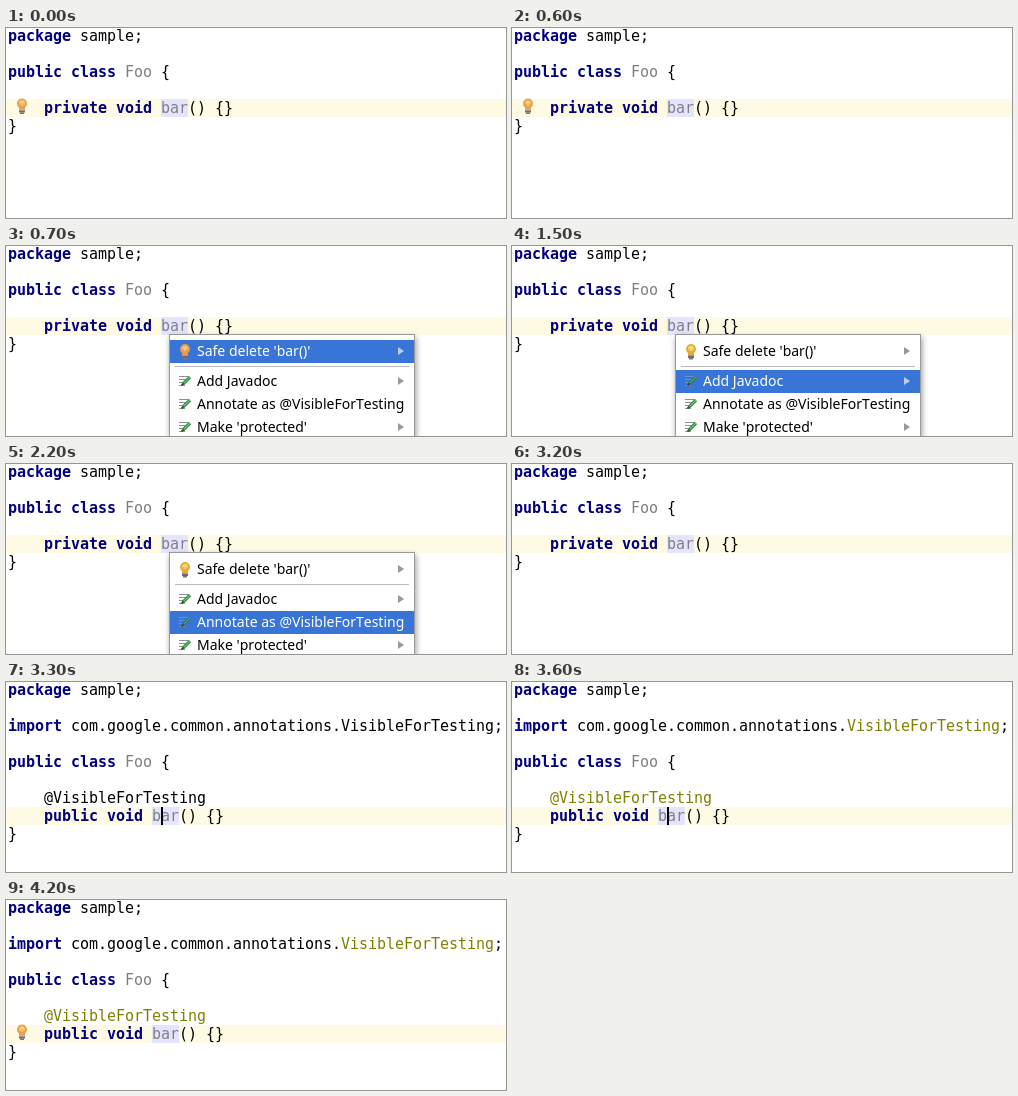
These frames come from a looping animation (500x190 px, 4.5 s). An HTML page with a canvas:

```html
<!DOCTYPE html>
<html lang="en">
<head>
<meta charset="utf-8">
<title>Annotate a method</title>
<style>
html, body { margin: 0; width: 100%; height: 100%; overflow: hidden; background: #fff; }
canvas { display: block; }
</style>
</head>
<body>
<canvas id="stage" width="500" height="190"></canvas>
<script>
const ctx = document.getElementById('stage').getContext('2d');
const LOOP = 4500, CELL = 9, LINE = 18, LEFT = 2;
const MONO = '15px "DejaVu Sans Mono", monospace';
const MENU_FONT = '14px "Noto Sans", sans-serif';
const BLACK = '#000', NAVY = '#000080', GRAY = '#808080', OLIVE = '#808000';

const MENU = [
  { text: "Safe delete 'bar()'", top: 94, icon: 'bulb', arrow: true },
  { text: 'Add Javadoc', top: 124, icon: 'pencil', arrow: true },
  { text: 'Annotate as @VisibleForTesting', top: 147, icon: 'pencil', arrow: false },
  { text: "Make 'protected'", top: 170, icon: 'pencil', arrow: true }
];

const colX = col => LEFT + col * CELL;
const lineY = row => row * LINE - 1;
const within = (t, from, to) => t >= from && t < to;

function rect(x, y, w, h, color) {
  ctx.fillStyle = color;
  ctx.fillRect(x, y, w, h);
}

function stroke(x1, y1, x2, y2, color, width) {
  ctx.strokeStyle = color;
  ctx.lineWidth = width;
  ctx.beginPath();
  ctx.moveTo(x1, y1);
  ctx.lineTo(x2, y2);
  ctx.stroke();
}

// Each part is [text, color]; keywords are navy and bold.
function code(row, col, ...parts) {
  for (const [text, color = BLACK] of parts) {
    ctx.font = (color === NAVY ? 'bold ' : '') + MONO;
    ctx.fillStyle = color;
    for (const ch of text) ctx.fillText(ch, colX(col++), lineY(row) + 14);
  }
}

function bulb(x, y, color, glow) {
  ctx.fillStyle = color;
  ctx.beginPath();
  ctx.arc(x, y, 5, 0, Math.PI * 2);
  ctx.fill();
  rect(x - 3, y + 3, 6, 3, color);
  ctx.fillStyle = glow;
  ctx.beginPath();
  ctx.arc(x, y - 0.5, 2.8, 0, Math.PI * 2);
  ctx.fill();
  stroke(x - 1.5, y, x - 0.5, y + 5, color, 0.8);
  stroke(x + 1.5, y, x + 0.5, y + 5, color, 0.8);
  rect(x - 3, y + 6, 6, 1, '#a79aa4');
  rect(x - 3, y + 7, 6, 2, '#6f6878');
  rect(x - 2, y + 9, 4, 1.5, '#7b7480');
}

function pencil(x, y, selected) {
  const ink = selected ? '#6f8fc4' : '#8d9298';
  [9, 11, 8, 6].forEach((w, i) => rect(x - 6, y - 5 + i * 3, w, 1, ink));
  stroke(x - 2, y + 3, x + 5, y - 4, selected ? '#2f7d6b' : '#3d9a4c', 3.4);
  stroke(x - 1, y + 2, x + 5, y - 4, selected ? '#5fa38e' : '#79c47f', 1);
  stroke(x - 3.5, y + 4.5, x - 1.5, y + 2.5, '#4b4038', 1.8);
}

function arrow(x, y, color) {
  ctx.fillStyle = color;
  ctx.beginPath();
  ctx.moveTo(x, y - 4);
  ctx.lineTo(x + 6, y);
  ctx.lineTo(x, y + 4);
  ctx.fill();
}

function menu(active) {
  ctx.save();
  ctx.shadowColor = 'rgba(0,0,0,0.4)';
  ctx.shadowBlur = 6;
  ctx.shadowOffsetX = 1;
  ctx.shadowOffsetY = 3;
  rect(163, 88, 246, 130, '#999');
  ctx.restore();
  rect(164, 89, 244, 101, '#fff');
  rect(169, 120, 234, 1, '#b8b8b8');

  ctx.font = MENU_FONT;
  ctx.fontKerning = 'none';
  MENU.forEach(({ text, top, icon, arrow: hasArrow }, i) => {
    const on = i === active;
    if (on) rect(164, top, 244, 23, '#3875d6');
    if (icon === 'bulb') bulb(179, top + 9, on ? '#e59a4e' : '#e5ac3c', on ? '#f6c48b' : '#f8d67c');
    else pencil(179, top + 11, on);
    if (hasArrow) arrow(392, top + 11, on ? '#b9cdf0' : '#999');
    ctx.fillStyle = on ? '#fff' : BLACK;
    ctx.fillText(text, 191, top + 16);
  });
}

function method(row, col, caretOn, bulbOn) {
  rect(0, lineY(row), 500, LINE, '#fffae3');
  rect(colX(col), lineY(row), 3 * CELL, LINE, '#e4e4ff');
  if (bulbOn) bulb(16, lineY(row) + 4.5, '#e9a24a', '#f7cd8a');
  code(row, col, ['bar', GRAY], ['() {}']);
  if (caretOn) rect(colX(col + 1), lineY(row), 2, LINE, BLACK);
}

function before(t) {
  method(4, 17, within(t, 100, 600), t < 700);
  code(2, 0, ['public class ', NAVY], ['Foo', GRAY], [' {']);
  code(4, 4, ['private void', NAVY]);
  code(5, 0, ['}']);
  if (within(t, 700, 3200)) menu(t < 1500 ? 0 : t < 2200 ? 1 : 2);
}

function after(t) {
  const mark = t < 3600 ? BLACK : OLIVE;
  method(7, 16, t < 4100, t >= 4200);
  code(2, 0, ['import ', NAVY], ['com.google.common.annotations.'], ['VisibleForTesting', mark], [';']);
  code(4, 0, ['public class ', NAVY], ['Foo', GRAY], [' {']);
  code(6, 4, ['@VisibleForTesting', mark]);
  code(7, 4, ['public void', NAVY]);
  code(8, 0, ['}']);
}

const start = performance.now();

function draw() {
  const t = (performance.now() - start) % LOOP;
  rect(0, 0, 500, 190, '#fff');
  code(0, 0, ['package ', NAVY], ['sample;']);
  if (t < 3300) before(t);
  else after(t);
  requestAnimationFrame(draw);
}
draw();
</script>
</body>
</html>
```
